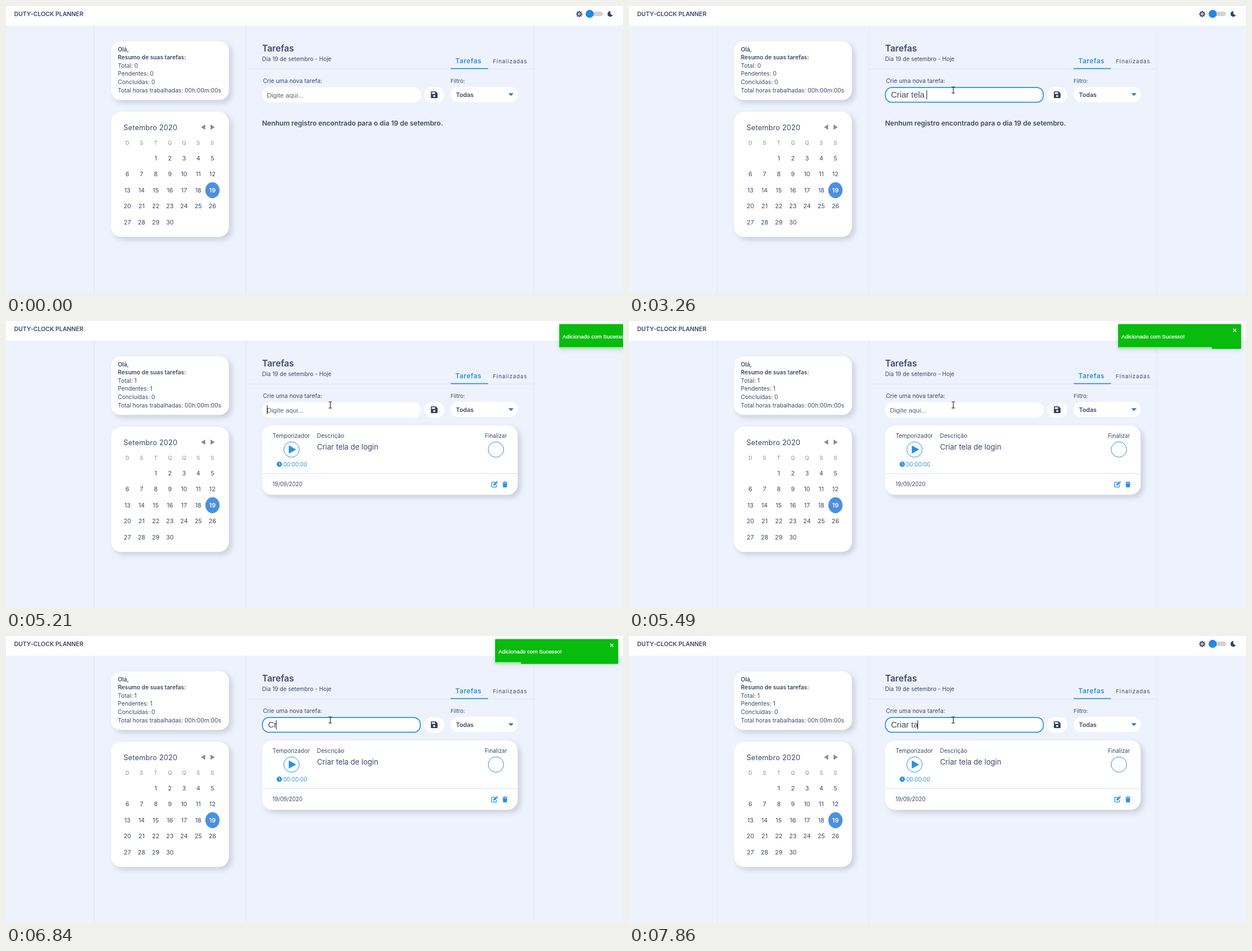
An HTML page that plays this animation: 1095x511 px, repeating every 8 s.

```html
<!DOCTYPE html>
<html lang="pt">
<head>
<meta charset="utf-8">
<title>Tarefas</title>
<style>
html, body { margin: 0; width: 100%; height: 100%; overflow: hidden; background: #eef2fd; }
svg { display: block; }
text { font-family: Inter, "Open Sans", sans-serif; fill: #3c4869; white-space: pre; }
.arial { font-family: "Liberation Sans", Arial, sans-serif; }
.bold { font-weight: 600; }
.mid { text-anchor: middle; }
.blue { fill: #2790e3; }
.gray { fill: #858b9b; }
.white { fill: #fff; }
.card { fill: #fff; filter: drop-shadow(5px 5px 5px rgba(0, 0, 0, .14)); }
.box { fill: #fff; }
.rule { stroke: #e0e6f4; fill: none; }
.ring { fill: none; stroke: #2790e3; }
.dark { fill: #35415f; }
</style>
</head>
<body>
<svg id="stage" width="1095" height="511" viewBox="0 0 1095 511"></svg>
<script>
const LOOP = 8000, ADDED = 4900, TOAST_IN = 4935, TOAST_OUT = 7360, SCALE = .916;
const stage = document.getElementById('stage');
const $ = id => document.getElementById(id);

const text = (x, y, size, str, cls = '', more = '') =>
  `<text x="${x}" y="${y}" font-size="${size}" class="${cls}" ${more}>${str}</text>`;
const rect = (x, y, w, h, r, cls, more = '') =>
  `<rect x="${x}" y="${y}" width="${w}" height="${h}" rx="${r}" class="${cls}" ${more}/>`;
const path = (d, cls, more = '') => `<path d="${d}" class="${cls}" ${more}/>`;

function calendar() {
  let out = rect(186.5, 188.3, 209.2, 223, 18.5, 'card')
    + text(208.5, 221.3, 12.7, 'Setembro 2020', '', 'letter-spacing=".2"')
    + path('M353.5 211v9.6l-7.5-4.8zM363 211v9.6l7.5-4.8z', '', 'fill="#8c8c8c"')
    + '<ellipse cx="366.4" cy="328" rx="12.6" ry="14.2" fill="#4a90e2"/>';
  const x = col => 215.4 + 25.15 * col;
  [...'DSTQQSS'].forEach((d, i) => out += text(x(i), 247.4, 9.3, d, 'mid gray'));
  for (let day = 1; day <= 30; day++) {
    const cell = day + 1, y = 274.5 + 28.5 * Math.floor(cell / 7);
    out += text(x(cell % 7), y, 10.7, day, day === 19 ? 'mid bold white' : 'mid');
  }
  return out;
}

function header() {
  let rays = '';
  for (let a = 0; a < 360; a += 45)
    rays += `<rect x="-1" y="-5.6" width="2" height="3" class="dark" transform="rotate(${a})"/>`;
  return rect(0, 0, 1095, 35, 0, 'box')
    + text(14.5, 18, 10.5, 'DUTY-CLOCK PLANNER', 'bold')
    + `<g transform="translate(1017.3 14.3)">${rays}
       <circle r="3.2" fill="none" stroke="#35415f" stroke-width="1.5"/><circle r="1.1" class="dark"/></g>`
    + rect(1030, 10, 29.5, 8, 4, '', 'fill="#d3d3d6"')
    + '<circle cx="1035.8" cy="14" r="7.2" fill="#2389e4"/>'
    + path('M1073 9.3A4.9 4.9 0 1 0 1077 16.2A4.6 4.6 0 0 1 1073 9.3z', 'dark');
}

function summary() {
  return rect(186.5, 63, 209.2, 104.2, 16.5, 'card')
    + text(198.5, 80.6, 10.2, 'Olá,', 'bold')
    + text(198.5, 95.2, 10.2, 'Resumo de suas tarefas:', 'bold')
    + text(198.5, 109.8, 10.2, '', '', 'id="total"')
    + text(198.5, 124.4, 10.2, '', '', 'id="pending"')
    + text(198.5, 139, 10.2, 'Concluídas: 0')
    + text(198.5, 153.6, 10.2, 'Total horas trabalhadas: 00h:00m:00s');
}

function form() {
  return text(454.5, 81.4, 15.6, 'Tarefas', 'bold')
    + text(454.5, 97.6, 10.05, 'Dia 19 de setembro - Hoje')
    + text(797.5, 102, 11.7, 'Tarefas', 'bold blue', 'letter-spacing=".6"')
    + text(864, 102, 9.6, 'Finalizadas', '', 'letter-spacing=".95"')
    + rect(789, 110.6, 66.5, 1.7, 0, 'blue')
    + text(456, 137.3, 10.35, 'Crie uma nova tarefa:')
    + text(789, 137.3, 9.6, 'Filtro:')
    + rect(454.5, 144.5, 281.5, 27.5, 12.5, 'box')
    + rect(455.2, 145.1, 280, 26.3, 11.5, 'ring', 'id="focus" stroke-width="1.7"')
    + text(463, 163, 11.7, 'Digite aqui...', 'arial', 'id="hint" fill-opacity=".85"')
    + text(465, 163, 14.66, '', 'arial', 'id="typed"')
    + rect(0, 150, 1, 16, 0, '', 'id="caret" fill="#222"')
    + rect(742, 144.5, 36, 27.5, 13.7, 'box')
    + path('M755.2 152h7.4l3.3 3.3v7.5q0 1.2-1.2 1.2h-9.5q-1.2 0-1.2-1.2v-9.6q0-1.2 1.2-1.2z', 'dark')
    + rect(755.6, 153.6, 6, 2.8, 0, 'white') + '<circle cx="759.9" cy="160.3" r="1.8" fill="#fff"/>'
    + rect(789, 144, 119, 27, 13, 'box')
    + text(798.5, 161.7, 10.7, 'Todas', 'bold')
    + path('M891.5 155.2h9.4l-4.7 5z', '', 'fill="#2f7cc4"');
}

function task() {
  return rect(454.5, 186, 453.5, 123.5, 18, 'card')
    + path('M455 271.8H908', 'rule', 'style="stroke:#cfe0f5"')
    + text(473, 207.8, 10.1, 'Temporizador') + text(551.8, 207.8, 10.2, 'Descrição')
    + text(850, 207.8, 9.9, 'Finalizar')
    + text(552, 228.8, 13.05, 'Criar tela de login')
    + '<circle cx="506.7" cy="228.8" r="13.7" class="ring"/><circle cx="869.5" cy="228.8" r="13.7" class="ring"/>'
    + path('M502.3 222.2l11.8 6.6l-11.8 6.6z', 'blue', 'stroke="#2790e3" stroke-linejoin="round"')
    + '<circle cx="485" cy="255" r="4.7" class="blue"/>'
    + path('M485 252v3.2l1.9 1.5', '', 'fill="none" stroke="#fff"')
    + text(492, 258.6, 9.7, '00:00:00', 'blue')
    + text(473, 294.3, 9.7, '19/09/2020')
    + path('M868 287.2h-5q-1 0-1 1v6.4q0 1 1 1h6.6q1 0 1-1v-2.8', 'ring', 'stroke-width="1.3"')
    + path('M865.2 290.6l4.6-4.6 2.2 2.2-4.6 4.6-2.5.4zM870.4 285.4l.8-.6 2 2-.7.9z', 'blue')
    + path('M881 286.8h2.8l.6-1h2.2l.6 1h2.8v1.3h-9zM881.6 288.8h7.8l-.5 6.5q-.1.9-1 .9h-4.8q-.9 0-1-.9z', 'blue');
}

function toast() {
  return `<g id="toast">${rect(868, 5.5, 218.5, 44.3, 1, '', 'fill="#07bc0c" style="filter:drop-shadow(0 1px 4px rgba(0,0,0,.12))"')}
    ${text(874, 31.2, 9.75, 'Adicionado com Sucesso!', 'arial white', 'stroke="#fff" stroke-width=".25"')}
    ${path('M1072.2 13.8l5.6 5.6m0-5.6l-5.6 5.6', '', 'stroke="#d8f5d9" stroke-width="1.5"')}
    ${rect(868, 46.6, 0, 3.2, 0, '', 'id="bar" fill="#fff" fill-opacity=".7"')}</g>`;
}

stage.innerHTML = header()
  + path('M156.5 35V511M426 35V511M936.5 35V511M426 112H936', 'rule')
  + summary() + calendar() + form()
  + text(454.5, 213, 11.97, 'Nenhum registro encontrado para o dia 19 de setembro.', 'bold', 'id="empty"')
  + `<g id="task">${task()}</g>` + toast()
  + path('M0 0v14l3.3-3 2.3 5.2 2.2-1-2.3-5h4.5z', '', 'id="arrow" fill="#fff" stroke="#111" stroke-width=".9"')
  + path('M-3 -5.5h2.2l.8.7l.8-.7h2.2M0 -5v10M-3 5.5h2.2l.8-.7l.8.7h2.2', '', 'id="beam" fill="none" stroke="#222" stroke-width="1.1"');

const clamp = v => Math.min(1, Math.max(0, v));
const mix = (a, b, k) => a + (b - a) * k;

function bezier(x1, y1, x2, y2) {
  const at = (a, b, s) => 3 * a * s * (1 - s) ** 2 + 3 * b * s * s * (1 - s) + s ** 3;
  return x => {
    let lo = 0, hi = 1;
    for (let i = 0; i < 20; i++) {
      const s = (lo + hi) / 2;
      at(x1, x2, s) < x ? lo = s : hi = s;
    }
    return at(y1, y2, lo);
  };
}
const bounce = bezier(.215, .61, .355, 1), ease = bezier(.25, .1, .25, 1);

// Stops are [progress, value]; each segment is eased on its own.
function keyframes(stops, p, easing) {
  const i = stops.findIndex(s => p < s[0]);
  if (i < 0) return stops[stops.length - 1][1];
  const [p0, v0] = stops[Math.max(0, i - 1)], [p1, v1] = stops[i];
  return mix(v0, v1, easing(clamp((p - p0) / (p1 - p0))));
}
const ENTER = [[0, 3000], [.6, -25], [.75, 10], [.9, -5], [1, 0]];
const LEAVE = [[0, 0], [.2, -20], [1, 2000]];

const FIRST = {
  phrase: 'Criar tela de login', focused: 680,
  keys: [1690, 1960, 2110, 2200, 2300, 2390, 2850, 2950, 3050, 3160, 3260, 3360,
    3420, 3490, 3740, 3960, 4470, 4620, 4700]
};
const SECOND = {
  phrase: 'Criar ta', focused: ADDED,
  keys: [6000, 6700, 6990, 7100, 7220, 7360, 7710, 7860]
};
const BLINK = 530;

const show = (id, on) => $(id).style.display = on ? '' : 'none';
const move = (id, x, y) => $(id).setAttribute('transform', `translate(${x} ${y})`);

function drawInput(t) {
  const { phrase, focused, keys } = t < ADDED ? FIRST : SECOND;
  const pressed = keys.filter(k => k <= t), count = pressed.length;
  $('typed').textContent = phrase.slice(0, count);
  show('hint', !count);
  show('focus', count);
  const touched = count ? pressed[count - 1] : focused;
  show('caret', t >= touched && Math.floor((t - touched) / BLINK) % 2 === 0);
  $('caret').setAttribute('x', count ? 464 + Math.round($('typed').getComputedTextLength()) : 463);
}

function drawMouse(t) {
  const a = 1 - (1 - clamp((t - 30) / 490)) ** 2, b = ease(clamp((t - 670) / 360));
  const x = mix(mix(1036, 528.5, a), 575.5, b), y = mix(mix(491, 166.5, a), 149.5, b);
  const inside = y < 172 && x < 736;
  show('arrow', t >= 30 && !inside);
  show('beam', inside);
  move('arrow', x, y);
  move('beam', x, y);
}

function drawToast(t) {
  const out = (t - TOAST_OUT) / 700;
  const shift = out < 0 ? keyframes(ENTER, (t - TOAST_IN) / 700, bounce) : keyframes(LEAVE, out, ease);
  show('toast', t >= TOAST_IN && out < 1);
  move('toast', shift * SCALE, 0);
  $('toast').setAttribute('opacity', 1 - ease(clamp((out - .2) / .8)));
  $('bar').setAttribute('width', 218.5 * (1 - clamp((t - 4907) / 2450)));
}

function draw(now) {
  const t = now % LOOP, added = t >= ADDED;
  $('total').textContent = 'Total: ' + +added;
  $('pending').textContent = 'Pendentes: ' + +added;
  show('empty', !added);
  show('task', added);
  drawInput(t);
  drawMouse(t);
  drawToast(t);
}

const start = performance.now();
function tick() {
  draw(performance.now() - start);
  requestAnimationFrame(tick);
}
tick();
</script>
</body>
</html>
```
